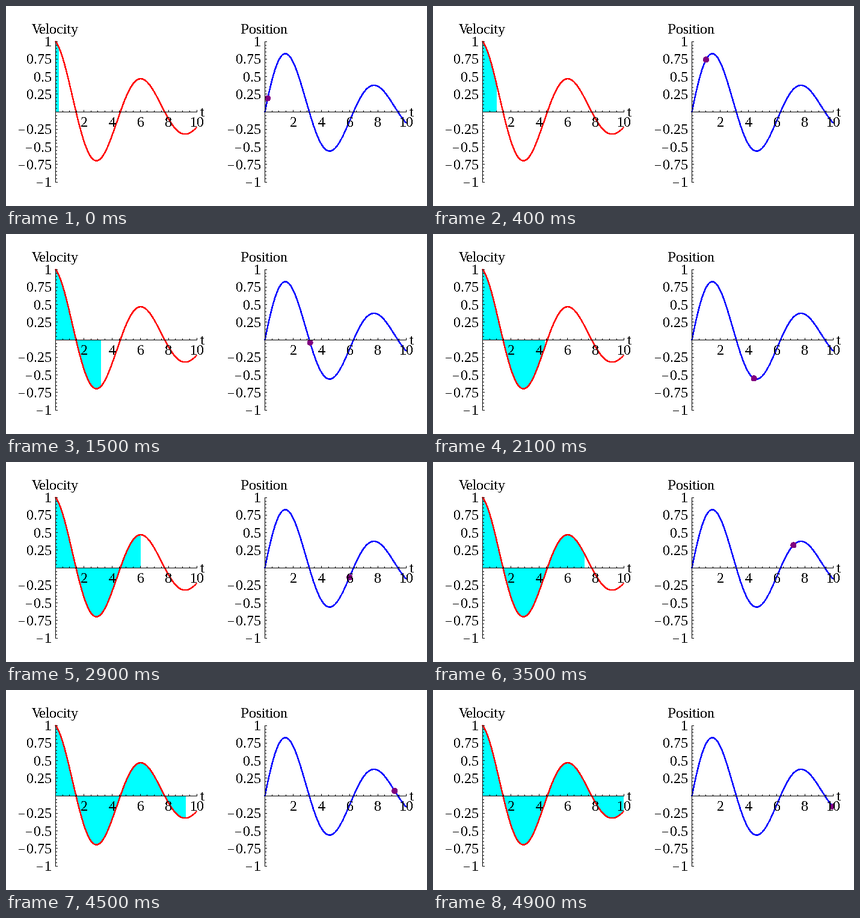
Recreate the animation shown at these times as a matplotlib script. Size 700 by 333 pixels, loop 5000 ms.

```python
import matplotlib.pyplot as plt
import numpy as np
from matplotlib.animation import FuncAnimation
from matplotlib.patches import Circle, Rectangle

WIDTH, HEIGHT, DPI = 700, 333, 64
FRAMES, INTERVAL = 50, 100
T_MAX, DECAY = 10, 1 / 8
X_SCALE, Y_SCALE, Y_ZERO = 23.45, 117, 176.2
LEFT, RIGHT = 82.5, 430.5
PT = 72 / DPI  # points per pixel
DIGIT = 12
FONT = dict(family="Liberation Serif", size=24 * PT, color="black",
            va="baseline", zorder=6)

# Crisp, pixel-fitted lettering
plt.rcParams.update({"text.antialiased": False, "text.hinting": "default",
                     "text.hinting_factor": 1})


def position(t):
    return np.exp(-DECAY * t) * np.sin(t)


def velocity(t):
    return np.exp(-DECAY * t) * (np.cos(t) - DECAY * np.sin(t))


def to_px(origin, t, value):
    return origin + X_SCALE * t, Y_ZERO - Y_SCALE * value


def pixel_center(v):
    return np.floor(v) + 0.5


def draw_line(ax, xs, ys):
    ax.plot(xs, ys, color="black", lw=PT, antialiased=False, snap=False,
            solid_capstyle="butt", zorder=5)


def draw_y_label(ax, origin, value):
    baseline = round(Y_ZERO - Y_SCALE * value + 8)
    label = f"{abs(value):g}"
    right = origin - 6.5
    ax.text(right, baseline, label, ha="right", **FONT)
    if value < 0:
        start = right - DIGIT * (len(label) - 0.5 * ("." in label))
        y = baseline - 6.5
        draw_line(ax, [start - 13, start - 3], [y, y])


def draw_axes(ax, origin, title):
    x0, y0 = pixel_center(origin), pixel_center(Y_ZERO)
    draw_line(ax, [x0 - 0.5, x0 + T_MAX * X_SCALE + 0.5], [y0, y0])
    draw_line(ax, [x0, x0], [y0 - Y_SCALE - 0.5, y0 + Y_SCALE + 0.5])

    for k in range(1, 21):
        x = pixel_center(origin + k / 2 * X_SCALE)
        major = k % 4 == 0
        draw_line(ax, [x, x], [y0 - (3.5 if major else 2.5), y0])
        if major:
            ax.text(x, 201, str(k // 2), ha="center", **FONT)

    for k in range(-20, 21):
        y = pixel_center(Y_ZERO - k / 20 * Y_SCALE)
        major = k % 5 == 0
        draw_line(ax, [x0, x0 + (3.5 if major else 2.5)], [y, y])
        if major and k:
            draw_y_label(ax, origin, k / 20)

    ax.text(origin - 1, 46, title, ha="center", **FONT)
    ax.text(origin + T_MAX * X_SCALE + 6, 184, "t", ha="left", **FONT)


def draw_curve(ax, origin, func, color):
    t = np.linspace(0, T_MAX, 300)
    ax.plot(*to_px(origin, t, func(t)), color=color, lw=1.3 * PT,
            antialiased=False, solid_capstyle="butt", zorder=3)


fig = plt.figure(figsize=(WIDTH / DPI, HEIGHT / DPI), dpi=DPI,
                 facecolor="white")
ax = fig.add_axes([0, 0, 1, 1])
ax.axis("off")

draw_axes(ax, LEFT, "Velocity")
draw_axes(ax, RIGHT, "Position")
draw_curve(ax, LEFT, velocity, "#ff0000")
draw_curve(ax, RIGHT, position, "#0000ff")

area, = ax.fill([LEFT], [Y_ZERO], color="#00ffff", lw=0, antialiased=False,
                zorder=1)
dot = ax.add_patch(Circle((RIGHT, Y_ZERO), 4.5, color="#800080", lw=0,
                          antialiased=False, zorder=4))
ax.set(xlim=(0, WIDTH), ylim=(HEIGHT, 0))
plot_box = Rectangle((RIGHT - 5, 50), T_MAX * X_SCALE + 5.5, 250,
                     transform=ax.transData)
dot.set_clip_path(plot_box)


def update(frame):
    now = (frame + 1) * T_MAX / FRAMES
    t = np.linspace(0, now, 200)
    x, y = to_px(LEFT, t, velocity(t))
    area.set_xy(np.column_stack([np.r_[x[0], x, x[-1]],
                                 np.r_[Y_ZERO, y, Y_ZERO]]))
    dot.center = to_px(RIGHT, now, position(now))
    return area, dot


animation = FuncAnimation(fig, update, frames=FRAMES, interval=INTERVAL,
                          repeat=True, repeat_delay=0)
plt.show()
```
